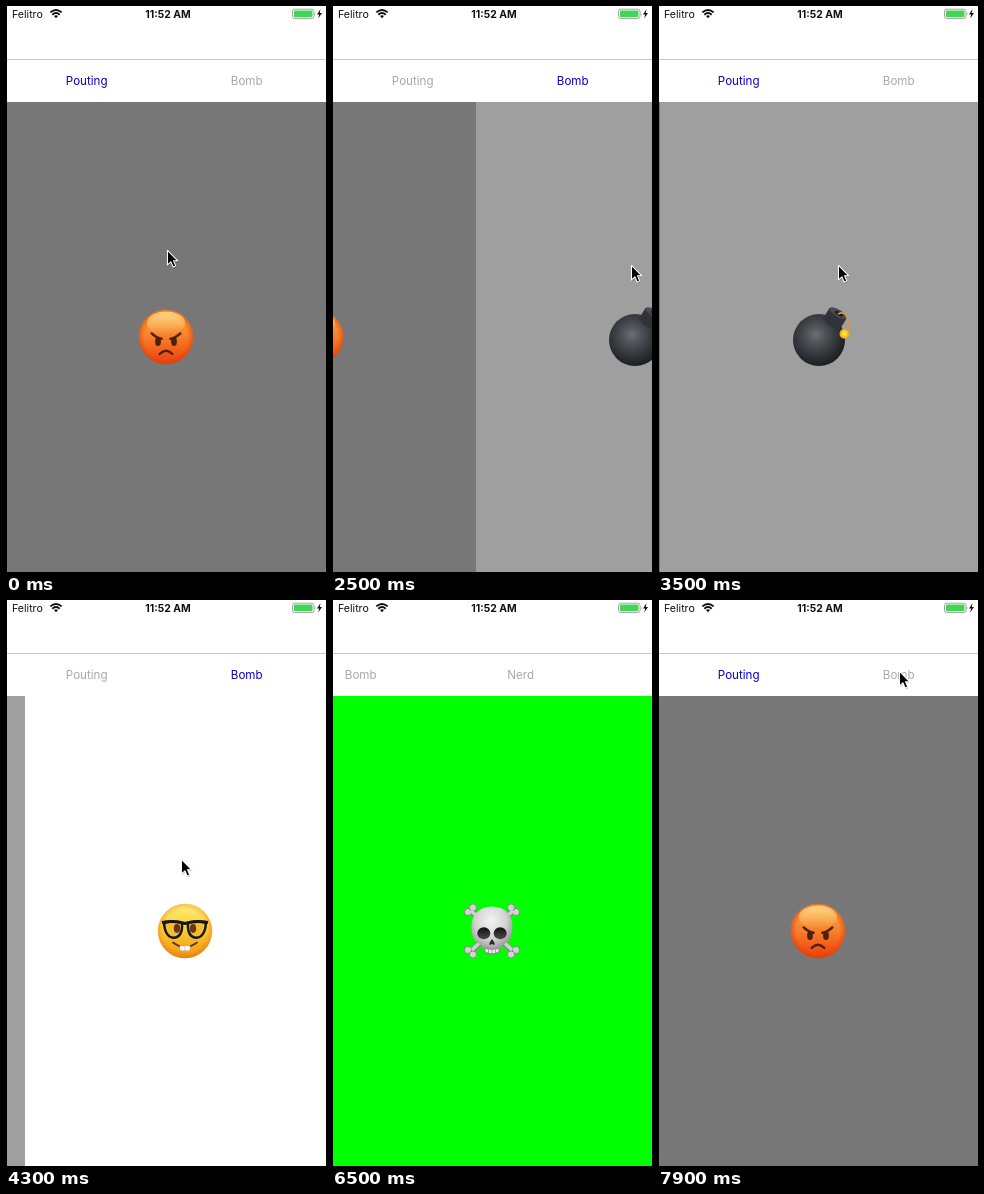
An HTML page that plays this animation: 320 by 566 pixels, repeating every 8 s.

```html
<!DOCTYPE html>
<html lang="en">
<head>
<meta charset="utf-8">
<title>Emoji pager</title>
<style>
  html, body { margin: 0; width: 100%; height: 100%; overflow: hidden; background: #fff; }
  svg { display: block; width: 100vw; height: 100vh; }
  text { font-family: Inter, Roboto, sans-serif; }
  .status { font-size: 10.6px; fill: #111; }
  .clock { font-size: 10.4px; font-weight: 700; text-anchor: middle; }
  .tab { font-size: 11.6px; text-anchor: middle; }
</style>
</head>
<body>
<svg viewBox="0 0 320 566">
  <defs>
    <linearGradient id="angry" x2="0" y2="1">
      <stop offset="0" stop-color="#f9b247"/><stop offset=".5" stop-color="#f6802a"/>
      <stop offset="1" stop-color="#ee3d0c"/>
    </linearGradient>
    <linearGradient id="sunny" x2="0" y2="1">
      <stop offset="0" stop-color="#fff07a"/><stop offset=".5" stop-color="#fbcb30"/>
      <stop offset="1" stop-color="#ee9414"/>
    </linearGradient>
    <radialGradient id="rim">
      <stop offset=".78" stop-color="#e0480a" stop-opacity="0"/>
      <stop offset="1" stop-color="#d9400a" stop-opacity=".6"/>
    </radialGradient>
    <linearGradient id="shine" x2="0" y2="1">
      <stop offset="0" stop-color="#ffe49a" stop-opacity=".75"/>
      <stop offset="1" stop-color="#ffe49a" stop-opacity="0"/>
    </linearGradient>
    <radialGradient id="iron" cx=".44" cy=".4" r=".6">
      <stop offset="0" stop-color="#6b6e73"/><stop offset=".4" stop-color="#46494e"/>
      <stop offset=".8" stop-color="#292c31"/><stop offset="1" stop-color="#1b1e22"/>
    </radialGradient>
    <radialGradient id="spark">
      <stop offset="0" stop-color="#fff27a"/><stop offset=".55" stop-color="#fcc81b"/>
      <stop offset="1" stop-color="#ef9d12"/>
    </radialGradient>
    <radialGradient id="bone" cx=".47" cy=".3" r=".7">
      <stop offset="0" stop-color="#f4f4f4"/><stop offset=".55" stop-color="#d2d2d2"/>
      <stop offset="1" stop-color="#808080"/>
    </radialGradient>
    <linearGradient id="socket" x2="0" y2="1">
      <stop offset="0" stop-color="#111"/><stop offset="1" stop-color="#4b4b4b"/>
    </linearGradient>
    <g id="limb">
      <path d="M-20-20 20 20" stroke="#8d8d8d" stroke-width="6"/>
      <g fill="#d4d4d4" stroke="#858585" stroke-width=".9">
        <circle cx="-24" cy="-19" r="3.6"/><circle cx="-19" cy="-23.5" r="3.6"/>
        <circle cx="24" cy="19" r="3.6"/><circle cx="19" cy="23.5" r="3.6"/>
      </g>
      <path d="M-21-20.5 20 19" stroke="#d0d0d0" stroke-width="3.4"/>
    </g>
  </defs>

  <rect width="320" height="566" fill="#fff"/>

  <g class="page">
    <rect y="96" width="320" height="470" fill="#777"/>
    <g transform="translate(160 331)">
      <circle r="27.2" fill="url(#angry)"/>
      <circle r="27.2" fill="url(#rim)"/>
      <ellipse cy="-14" rx="19" ry="11.5" fill="url(#shine)"/>
      <g fill="#4d210e">
        <ellipse cx="-8" cy="4.4" rx="2.9" ry="4.5"/><ellipse cx="8" cy="4.4" rx="2.9" ry="4.5"/>
      </g>
      <g fill="none" stroke="#4d210e" stroke-width="2.4" stroke-linecap="round">
        <path d="M-14.3-3.6Q-10 .8-4.4 1.8M14.3-3.6Q10 .8 4.4 1.8"/>
        <path d="M-6.4 17Q0 10.6 6.4 17"/>
      </g>
    </g>
  </g>

  <g class="page">
    <rect y="96" width="320" height="470" fill="#9f9f9f"/>
    <g transform="translate(160 331)">
      <circle cx="-1" cy="3" r="26" fill="url(#iron)"/>
      <g transform="translate(14.8 -18.5) rotate(31)">
        <path d="M-10-6Q0-13 10-6V7Q0 11-10 7Z" fill="#303338"/>
        <ellipse cy="-6.3" rx="9.6" ry="3.6" fill="#484b50"/>
        <ellipse cx="1" cy="-6.3" rx="4.5" ry="1.8" fill="#1c1e22"/>
      </g>
      <path d="M18-23Q26-27 28-16Q29-9 25-5" fill="none" stroke="#d39a4b" stroke-width="1.7"/>
      <circle cx="24.5" cy="-3.2" r="5" fill="url(#spark)"/>
    </g>
  </g>

  <g class="page">
    <rect y="96" width="320" height="470" fill="#fff"/>
    <g transform="translate(160 331)">
      <circle r="27.2" fill="url(#sunny)"/>
      <circle r="27.2" fill="url(#rim)" opacity=".45"/>
      <g fill="#f2bd31" stroke="#171717" stroke-width="2.4">
        <path id="lens" d="M-21-8Q-12-11-3-8Q-2 6-11.5 6.8Q-20 6-21-8Z"/>
        <use href="#lens" transform="scale(-1 1)"/>
      </g>
      <path d="M-23-8.5Q-11-11 0-7.5Q11-11 23-8.5" fill="none" stroke="#171717" stroke-width="3"/>
      <g fill="#6b3710">
        <ellipse cx="-8" cy="-2.5" rx="3.2" ry="4.4"/><ellipse cx="8" cy="-2.5" rx="3.2" ry="4.4"/>
      </g>
      <path d="M-12 11.5Q0 20.5 12 11.5" fill="none" stroke="#693510" stroke-width="1.9" stroke-linecap="round"/>
      <path d="M-5 14.4Q0 15.5 5 14.4V19Q2.5 20.5 0 19.2Q-2.5 20.5-5 19Z" fill="#fff" stroke="#c9b98d" stroke-width=".5"/>
      <path d="M0 15V19.3" stroke="#b8a98a" stroke-width=".6"/>
    </g>
  </g>

  <g class="page">
    <rect y="96" width="320" height="470" fill="#0f0"/>
    <g transform="translate(160 331)">
      <use href="#limb"/><use href="#limb" transform="scale(-1 1)"/>
      <path d="M0-24.5C13-24.5 20.5-16 20.5-5C20.5 4 19 10 13 12.5Q9.5 14 9 18Q8.5 23.5 0 23.5Q-8.5 23.5-9 18Q-9.5 14-13 12.5C-19 10-20.5 4-20.5-5C-20.5-16-13-24.5 0-24.5Z" fill="url(#bone)"/>
      <ellipse cx="-8.2" cy="2.2" rx="6.5" ry="6" fill="url(#socket)"/>
      <ellipse cx="8.2" cy="2.2" rx="6.5" ry="6" fill="url(#socket)"/>
      <path d="M0 8Q4 13 2 14L0 13-2 14Q-4 13 0 8Z" fill="#292929"/>
      <path d="M-7 17.5Q0 19.5 7 17.5V21Q0 24.5-7 21Z" fill="#ececec" stroke="#858585" stroke-width=".7"/>
      <path d="M-3.5 18.5V22.5M0 18.8V23M3.5 18.5V22.5" stroke="#858585" stroke-width=".7"/>
    </g>
  </g>

  <path d="M0 53.5H320" stroke="#c8c8c8"/>
  <g id="tabs"></g>

  <text class="status" x="6" y="11.6">Felitro</text>
  <text class="status clock" x="162" y="11.6">11:52 AM</text>
  <g fill="none" stroke="#111" stroke-width="1.9">
    <path d="M44.3 6.4Q50 1.4 55.7 6.4M46.3 8.7Q50 5.5 53.7 8.7"/>
    <path d="M48 10 50 12.2 52 10Q50 8.6 48 10Z" fill="#111" stroke="none"/>
  </g>
  <rect x="286.5" y="3.2" width="21.5" height="9.4" rx="2.2" fill="#fff" stroke="#8d8d8d" stroke-width=".8"/>
  <rect x="288" y="4.6" width="18.5" height="6.6" rx="1" fill="#43d558"/>
  <path d="M308.8 6.2Q310.4 7.9 308.8 9.6Z" fill="#8d8d8d"/>
  <path d="M314.5 3 311 8.5H313.2L312.2 12.5 316 6.9H313.7Z" fill="#111"/>

  <g id="cursor">
    <g transform="scale(.93)">
      <path d="M.8 1.2V16.7L4.4 13.4 6.9 19 9.9 17.7 7.4 12.2H12.3Z" opacity=".18" transform="translate(.5 1)"/>
      <path d="M.5 .5V16L4.2 12.7 6.6 18.3 9.4 17.1 7 11.6H11.6Z" stroke="#fff" stroke-width="1.1" stroke-linejoin="round"/>
    </g>
  </g>
  <rect width="1" height="566" fill="#000"/>
</svg>

<script>
const LOOP = 8000, STEP = 100, WIDTH = 320, TAB_WIDTH = 160;
const HOVER = 150, GLIDE = 400, SLIDE = 300, SETTLE = 400;
const TITLES = ["Pouting", "Bomb", "Nerd", "Skull"];

const clamp = u => Math.min(1, Math.max(0, u));
const smooth = u => u * u * (3 - 2 * u);
const easeOut = u => 1 - (1 - u) ** 3;
const mix = (a, b, u) => a + (b - a) * u;
const span = (t, start, length) => clamp((t - start) / length);

// Taps select a tab at once and slide to its page.
const tap = (at, x, y, page) => ({
  page, x, y, toX: x, start: at - HOVER, end: at, selectAt: at,
  progress: t => smooth(span(t, at, SLIDE))
});

// Swipes follow the finger, then settle and only then select the tab.
function swipe(start, length, x, toX, y, page) {
  const end = start + length, share = Math.abs(toX - x) / WIDTH;
  return {
    page, x, y, toX, start, end, selectAt: end + SETTLE,
    progress: t => mix(share * span(t, start, length), 1, easeOut(span(t, end, SETTLE)))
  };
}

const home = { page: 0, toX: 161, y: 244, end: 0 };
const toNerd = swipe(3900, 180, 290, 175, 259, 2);
const tabSwipe = swipe(6250, 250, 214, 322, 73);
const gestures = [
  tap(1656, 238, 83, 1),
  swipe(2300, 200, 155, 299, 259, 0),
  swipe(3000, 180, 286, 180, 259, 1),
  toNerd,
  tap(5850, 214, 73, 3),
  tabSwipe,
  tap(7250, 80, 77, 0),
  tap(LOOP + 50, 241, 71, 1)
];
const turns = gestures.filter(g => g.page !== undefined);

const pages = [...document.querySelectorAll(".page")];
const tabs = document.getElementById("tabs");
const cursor = document.getElementById("cursor");

const labels = TITLES.map((title, i) => {
  const label = document.createElementNS("http://www.w3.org/2000/svg", "text");
  label.setAttribute("class", "tab");
  label.setAttribute("x", (i + .5) * TAB_WIDTH + .7);
  label.setAttribute("y", 79);
  label.textContent = title;
  tabs.append(label);
  return label;
});

const move = (node, x, y = 0) =>
  node.setAttribute("transform", `translate(${Math.round(x)} ${Math.round(y)})`);

function drawPages(t) {
  const next = turns.findLastIndex(g => g.start <= t);
  const from = (turns[next - 1] ?? home).page;
  const to = (turns[next] ?? home).page;
  const p = next < 0 ? 1 : turns[next].progress(t);
  const side = Math.sign(to - from) * WIDTH;
  pages.forEach(page => move(page, -2 * WIDTH));
  move(pages[from], -p * side);
  move(pages[to], (1 - p) * side);
}

function drawTabs(t) {
  const { page } = turns.findLast(g => g.selectAt <= t) ?? home;
  labels.forEach((label, i) => label.setAttribute("fill", i === page ? "#0800c4" : "#a8a8a8"));
  const shift = smooth(span(t, toNerd.selectAt, SLIDE)) - tabSwipe.progress(t);
  move(tabs, -shift * 2 * TAB_WIDTH);
}

// The pointer rests after each gesture and glides just in time for the next.
function drawCursor(t) {
  const i = gestures.findIndex(g => g.end > t);
  const next = gestures[i], last = gestures[i - 1] ?? home;
  const glide = Math.min(GLIDE, next.start - last.end);
  const u = smooth(span(t, next.start - glide, glide));
  const drag = span(t, next.start, next.end - next.start);
  move(cursor, mix(mix(last.toX, next.x, u), next.toX, drag), mix(last.y, next.y, u));
}

const start = performance.now();
function tick() {
  const elapsed = (performance.now() - start) % LOOP;
  const t = Math.floor(elapsed / STEP) * STEP;
  drawPages(t);
  drawTabs(t);
  drawCursor(t);
  requestAnimationFrame(tick);
}
tick();
</script>
</body>
</html>
```
